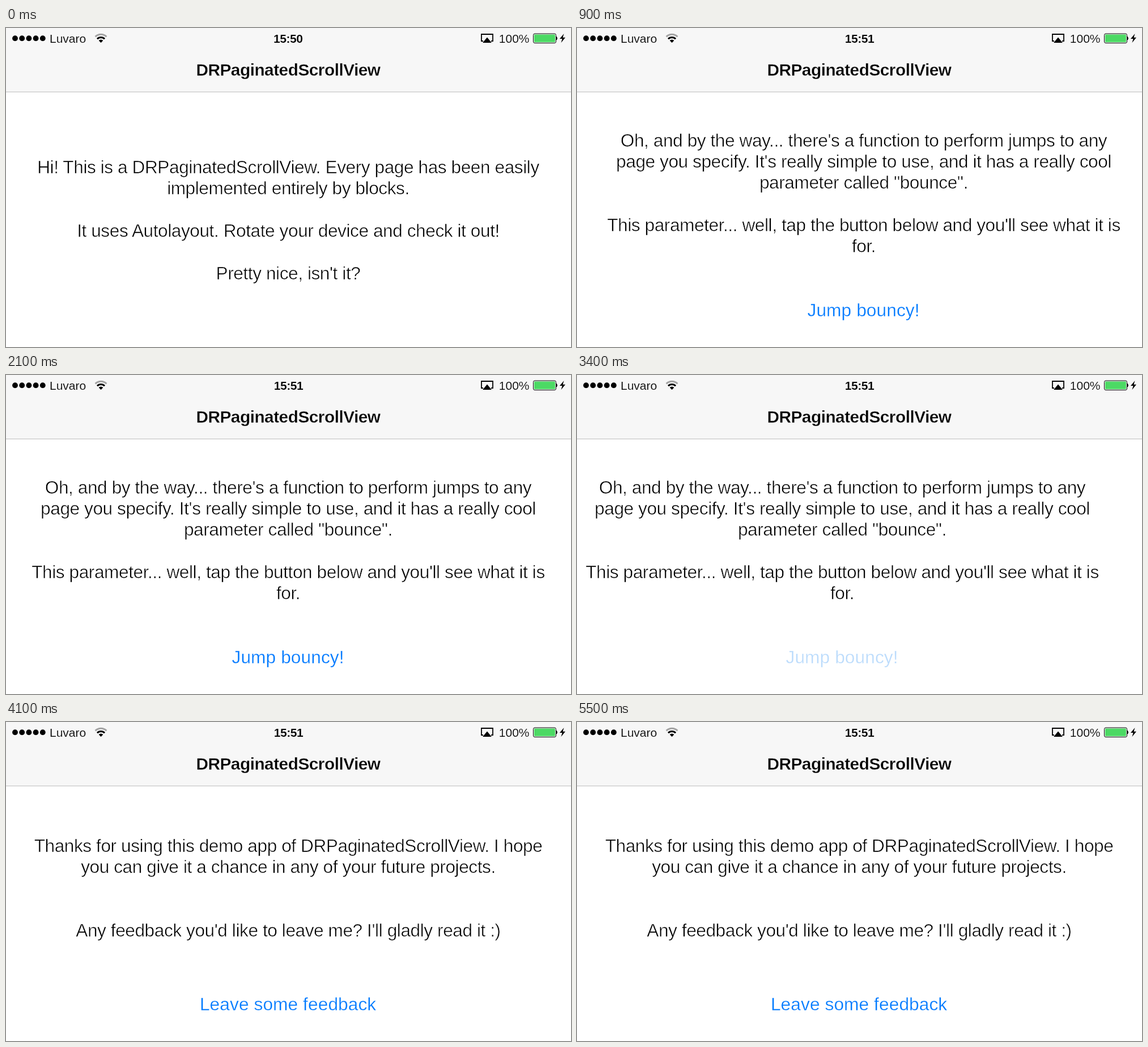
An HTML page that plays this animation: 997x562 px, repeating every 5.6 s.

```html
<!DOCTYPE html>
<html lang="en">
<head>
<meta charset="utf-8">
<title>DRPaginatedScrollView</title>
<style>
  html, body { margin: 0; width: 100%; height: 100%; overflow: hidden; background: #fff; }
  svg { display: block; width: 997px; height: 562px; }
  text { font-family: "Liberation Sans", Arial, sans-serif; }
  /* a background-coloured outline thins the strokes to a light weight */
  .body { font-size: 31.6px; letter-spacing: -.42px; text-anchor: middle; stroke: #fff; stroke-width: .65px; }
  .button { font-size: 31.6px; letter-spacing: .12px; text-anchor: middle; fill: #007aff; stroke: #fff; stroke-width: .35px; }
  .title { font-size: 29.8px; font-weight: bold; letter-spacing: -.5px; text-anchor: middle; stroke: #f7f7f7; stroke-width: .4px; }
  .status { font-size: 21px; stroke: #f7f7f7; stroke-width: .2px; }
  .clock { font-weight: bold; letter-spacing: -.45px; text-anchor: middle; }
</style>
</head>
<body>
<svg viewBox="0 0 997 562">
  <g id="pages"></g>

  <rect width="997" height="112.3" fill="#f7f7f7"/>
  <rect y="112.3" width="997" height=".88" fill="#b2b2b2"/>
  <text class="title" x="498" y="84">DRPaginatedScrollView</text>

  <g id="dots"></g>
  <text class="status" x="77" y="26">Luvaro</text>
  <g fill="none" stroke-width="3">
    <path d="M157.6 15.4A14 14 0 0 1 177.4 15.4" stroke="#a3a3a3"/>
    <path d="M161 19.2A9.2 9.2 0 0 1 174 19.2" stroke="#000"/>
  </g>
  <path d="M167.5 26L163.6 22.1A5.5 5.5 0 0 1 171.4 22.1Z"/>

  <text class="status clock" id="before" x="497.8" y="26">15:50</text>
  <text class="status clock" id="after" x="498.6" y="26">15:51</text>

  <path d="M842 23H839V11H859V23H856" fill="none" stroke="#000" stroke-width="1.8"/>
  <path d="M849 16.5L857 26H841Z"/>
  <text class="status" x="869.8" y="26">100%</text>
  <rect x="930.5" y="10" width="40" height="16.5" rx="2.5" fill="#f7f7f7" stroke="#000"/>
  <rect x="932" y="11.5" width="37" height="13.5" rx="1" fill="#4cd964"/>
  <path d="M971.5 15.5Q973.5 18.2 971.5 21Z" stroke="#000"/>
  <path d="M984.5 10L977 19H981.5L979.5 26L987 16.8H982.5Z"/>
</svg>
<script>
const LOOP = 5600, WIDTH = 997, LEADING = 37.3;
const $ = id => document.getElementById(id);

function add(parent, tag, attrs, text = '') {
  const el = document.createElementNS('http://www.w3.org/2000/svg', tag);
  for (const key in attrs) el.setAttribute(key, attrs[key]);
  el.textContent = text;
  return parent.appendChild(el);
}

const pages = [
  { top: 256, lines: [
    'Hi! This is a DRPaginatedScrollView. Every page has been easily',
    'implemented entirely by blocks.', '',
    'It uses Autolayout. Rotate your device and check it out!', '',
    "Pretty nice, isn't it?"] },
  { top: 208.5, button: 'Jump bouncy!', lines: [
    "Oh, and by the way... there's a function to perform jumps to any",
    "page you specify. It's really simple to use, and it has a really cool",
    'parameter called "bounce".', '',
    "This parameter... well, tap the button below and you'll see what it is",
    'for.'] },
  { top: 228.5, button: 'Leave some feedback', lines: [
    'Thanks for using this demo app of DRPaginatedScrollView. I hope',
    'you can give it a chance in any of your future projects.', '', '',
    "Any feedback you'd like to leave me? I'll gladly read it :)"] }
];

const buttons = pages.map(({ top, lines, button }, i) => {
  const x = i * WIDTH + 498;
  lines.forEach((line, n) => {
    if (line) add($('pages'), 'text', { class: 'body', x, y: top + n * LEADING }, line);
  });
  return button && add($('pages'), 'text', { class: 'button', x: x - .4, y: 507.6 }, button);
});

for (let i = 0; i < 5; i++) add($('dots'), 'circle', { cx: 16 + i * 12.2, cy: 18.2, r: 4.9 });

// steps: [start in ms, value], each value held until the next
function play(el, prop, steps) {
  const frames = steps.map(([ms, value]) => ({ offset: ms / LOOP, [prop]: value, easing: 'step-end' }));
  frames.push({ offset: 1, [prop]: steps[steps.length - 1][1] });
  el.animate(frames, { duration: LOOP, iterations: Infinity });
}

// scroll offset in px, one value per 100 ms
const scroll = (start, from, moves) =>
  moves.map((dx, i) => [start + i * 100, `translateX(${-(from + dx)}px)`]);

play($('pages'), 'transform', [
  [0, 'translateX(0px)'],
  ...scroll(300, 0, [24, 160, 480, 780, 915, 967, 989, 995, WIDTH]),
  ...scroll(3400, WIDTH, [30, 230, 590, 907, 1015, 1013, 1001, WIDTH])
]);
play(buttons[1], 'fill', [[0, '#007aff'], [3000, '#bcdcfc']]);
play($('before'), 'opacity', [[0, 1], [600, 0]]);
play($('after'), 'opacity', [[0, 0], [600, 1]]);
</script>
</body>
</html>
```
